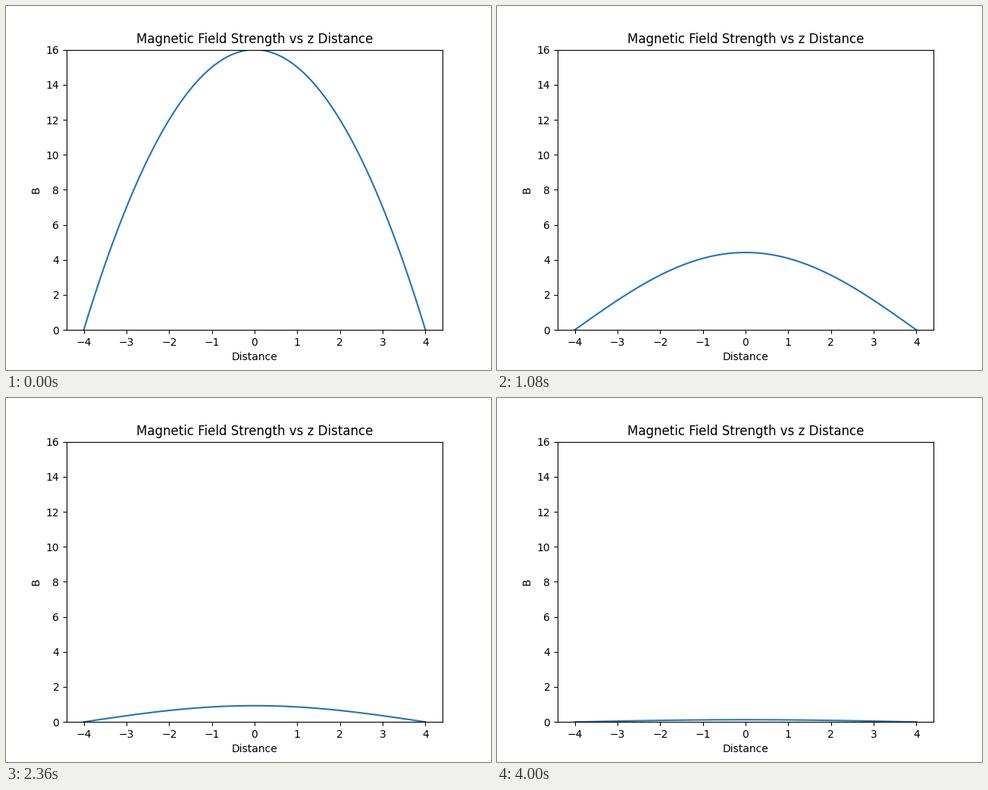
A matplotlib script for the animation above (4.04 s loop, 640 px wide and 480 px high).

```python
import numpy as np
import matplotlib.pyplot as plt
from matplotlib.animation import FuncAnimation

HALF = 4.0       # field vanishes at z = -HALF and z = HALF
DECAY = 0.04879  # decay of the lowest mode per frame
FRAMES = 101

z = np.linspace(-HALF, HALF, 100)

# Cosine series of HALF**2 - z**2, each mode diffusing at its own rate
n = np.arange(1, 400, 2)
sign = np.where(n % 4 == 1, 1, -1)
coeffs = sign * 32 * HALF**2 / (n * np.pi) ** 3
modes = np.cos(np.outer(z, n) * np.pi / (2 * HALF))


def field(step):
    if step == 0:
        return HALF**2 - z**2
    return modes @ (coeffs * np.exp(-DECAY * step * n**2))


fig, ax = plt.subplots(figsize=(6.4, 4.8), dpi=100)
line, = ax.plot(z, field(0))
ax.set_xlim(-1.1 * HALF, 1.1 * HALF)
ax.set_ylim(0, HALF**2)
ax.set_title("Magnetic Field Strength vs z Distance")
ax.set_xlabel("Distance")
ax.set_ylabel("B")


def update(step):
    line.set_ydata(field(step))
    return line,


anim = FuncAnimation(fig, update, frames=FRAMES, interval=40, repeat=True,
                     repeat_delay=0)
plt.show()
```
